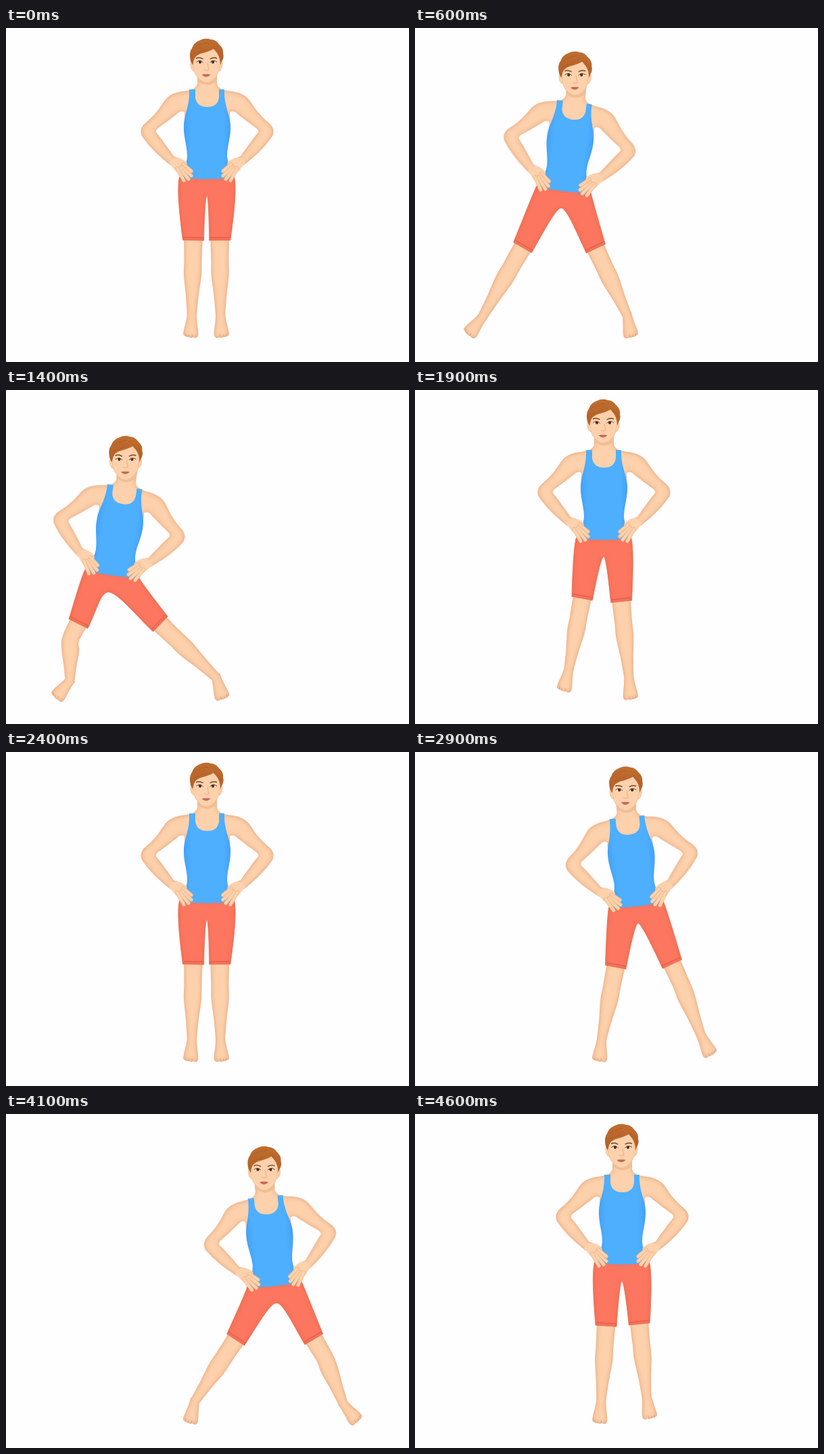
Animation of 596 by 495 pixels, one loop 4700 ms. Source, as an HTML page:

```html
<!DOCTYPE html>
<html lang="en">
<head>
<meta charset="utf-8">
<title>Side lunges</title>
<style>
  html, body { margin: 0; width: 100%; height: 100%; overflow: hidden; background: #fefdff; }
  svg { display: block; width: 596px; height: 495px; }
  .skin { fill: #fdd1ab; }
  .line { fill: none; stroke: #dfa67c; stroke-width: 1; stroke-linecap: round; }
  .finger { fill: none; stroke-linecap: round; }
  .soft { filter: url(#shade); }
</style>
</head>
<body>
<svg viewBox="0 0 596 495">
  <defs>
    <!-- darkens the inside of every edge -->
    <filter id="shade" x="-10%" y="-10%" width="120%" height="120%" color-interpolation-filters="sRGB">
      <feGaussianBlur in="SourceAlpha" stdDeviation="3.5" result="blur"/>
      <feComposite in="SourceAlpha" in2="blur" operator="out" result="rim"/>
      <feFlood flood-color="#b0552a" flood-opacity=".42"/>
      <feComposite in2="rim" operator="in" result="tint"/>
      <feMerge><feMergeNode in="SourceGraphic"/><feMergeNode in="tint"/></feMerge>
    </filter>
    <linearGradient id="blue">
      <stop offset="0" stop-color="#3f9bf2"/><stop offset=".2" stop-color="#4eafff"/>
      <stop offset=".8" stop-color="#4eafff"/><stop offset="1" stop-color="#3f9bf2"/>
    </linearGradient>
    <linearGradient id="hair" x2="0" y2="1">
      <stop offset="0" stop-color="#c06d2f"/><stop offset="1" stop-color="#b2602a"/>
    </linearGradient>

    <path id="arm" class="skin" d="M270 93C254 94 243 97 235 107C228 117 221 129 207 140Q196 149 201 160
      C212 177 230 193 243 203L256 207L259 194L248 190C241 180 232 167 223 156Q220 153 224 149
      C234 142 244 134 252 128Q259 121 264 125L274 105Z"/>
    <g id="hand">
      <path class="skin" d="M241 200Q246 191 254 192Q262 194 267 199L269 208L262 217Q255 217 250 211Z"/>
      <g class="finger" id="fingers"></g>
    </g>
    <g id="foot">
      <path class="skin" d="M-7 -30C-7 -17 -10 -9 -11 0Q-12 6 -8 6Q-6 8 -3 7Q0 9 3 7Q10 10 11 3
        C11 -5 7 -16 7 -30Z"/>
      <path class="line" d="M-7 3V6M-3 4V7M2 3V7" opacity=".8"/>
    </g>
  </defs>

  <g class="soft"><path id="shinL" class="skin"/><use id="footL" href="#foot"/></g>
  <g class="soft"><path id="shinR" class="skin"/><use id="footR" href="#foot"/></g>
  <path id="shorts" class="soft" fill="#fd765f" stroke="#fd765f" stroke-width=".8" stroke-linejoin="round"/>
  <path id="hems" fill="none" stroke="#dd5743" stroke-width="1"/>

  <g id="torso">
    <g class="soft">
      <use href="#arm"/><use href="#arm" transform="translate(595) scale(-1 1)"/>
      <path class="skin" d="M283 62L283 83Q281 91 267 93L254 103L264 125L264 150H331L331 125L341 103
        L328 93Q314 91 312 83L312 62Z"/>
    </g>
    <path fill="url(#blue)" d="M271 91L280 91L280 103Q282 117 298 117Q313 117 315 103L315 91L323 91
      C322 115 331 127 332 143C333 162 327 174 327 190C328 203 333 211 337 222Q297 226 258 222
      C262 211 267 203 268 190C268 174 262 162 263 143C264 127 272 115 271 91Z"/>
    <use href="#hand"/><use href="#hand" transform="translate(595) scale(-1 1)"/>
  </g>

  <g id="head">
    <path d="M283 71Q297 89 312 71L312 78Q298 91 283 78Z" fill="#f0be94"/>
    <g class="skin" stroke="#efbd94" stroke-width=".8">
      <path d="M278 50Q272 47 273 55Q274 64 279 64ZM315 50Q321 47 320 55Q319 64 314 64Z"/>
      <path d="M277 43C276 56 278 65 281 70Q289 81 296 81Q304 81 312 70C315 65 317 56 316 43
        Q312 26 296 25Q280 26 277 43Z"/>
    </g>
    <path fill="url(#hair)" d="M276 55L273 49Q270 36 275 30Q278 21 287 18Q295 14 303 17Q310 17 315 24
      Q322 30 321 38Q323 43 319 50L317 55Q317 44 312 37L307 31Q300 35 288 38Q280 41 278 47Z"/>
    <path d="M278 38Q288 36 296 31M278 30Q287 23 299 22M307 29Q315 33 318 42" fill="none"
      stroke="#a4551f" stroke-width=".9" opacity=".6"/>
    <path d="M281 45Q286 42.5 291.500 46M301.500 46Q307 42.5 312 45" fill="none" stroke="#7b4427" stroke-width="1.4"/>
    <path d="M282 51Q287 47 291 51.5Q287 53.5 282 51ZM302 51.5Q306 47 311 51Q306 53.5 302 51.5Z" fill="#fff4ec"/>
    <circle cx="287" cy="50.5" r="2.2" fill="#4d2d1f"/><circle cx="306" cy="50.5" r="2.2" fill="#4d2d1f"/>
    <path d="M281.500 50.5Q287 46 291.500 51.5M301.500 51.5Q306 46 312 50.5" fill="none" stroke="#5d3624"/>
    <path class="line" d="M298 52Q299 58 300 61M293 62Q296 64 300 62" opacity=".8"/>
    <path d="M290 69.500Q294 67.500 296 68.500Q299 67.500 302 69.500Q296 75.500 290 69.500Z" fill="#cf735f"/>
    <path d="M290 69.500Q296 71 302 69.500" fill="none" stroke="#aa5747" stroke-width=".8"/>
  </g>
</svg>
<script>
const LOOP = 4700, STEP = 100, CENTER = 297, WAIST = 221;
const $ = id => document.getElementById(id);

// time, body shift, waist y, lean, foot reach, foot lift, knee bend
const LUNGE = [
  [0, 0, 221, 0, 0, 0, 0],
  [150, 2, 221, .5, 4, -2, 0],
  [300, 12, 222, 3.5, 58, -9, 0],
  [400, 30, 226, 6, 116, -8, 3],
  [500, 52, 231, 6.5, 168, -6, 0],
  [600, 77, 239, 7, 190, -2, 0],
  [750, 112, 256, 7, 192, 0, 13],
  [927, 144, 272, 7, 192, 0, 32],
  [1200, 159, 280, 8, 194, 0, 33],
  [1400, 140, 272, 8.3, 195, 0, 16],
  [1600, 75, 240, 4, 190, -2, 2],
  [1700, 51, 228, 1.5, 140, -8, 0],
  [1800, 32, 221, 0, 87, -12, 0],
  [1900, 18, 219, 0, 52, -12, 0],
  [2000, 9, 220, 0, 28, -7, 0],
  [2150, 2, 221, 0, 6, -1, 0],
  [2300, 0, 221, 0, 0, 0, 0]
];
// The lunge to the right runs with slightly different timing.
const RIGHT_TIMING = [[2500, 0], [3100, 600], [3650, 1200], [4200, 1600], [4700, 2100]];

const segment = (rows, t) => {
  let i = 0;
  while (i < rows.length - 2 && t > rows[i + 1][0]) i++;
  return i;
};

function warp(t) {
  const i = segment(RIGHT_TIMING, t), [t0, u0] = RIGHT_TIMING[i], [t1, u1] = RIGHT_TIMING[i + 1];
  return u0 + (u1 - u0) * (t - t0) / (t1 - t0);
}

// Smooth cubic interpolation between the poses.
function sample(u) {
  u = Math.min(u, 2300);
  const i = segment(LUNGE, u), a = LUNGE[i], b = LUNGE[i + 1];
  const prev = LUNGE[i - 1] || a, next = LUNGE[i + 2] || b;
  const span = b[0] - a[0], k = (u - a[0]) / span, k2 = k * k, k3 = k2 * k;
  return a.slice(1).map((v, j) => {
    j++;
    const m0 = (b[j] - prev[j]) / (b[0] - prev[0]) * span;
    const m1 = (next[j] - v) / (next[0] - a[0]) * span;
    return (2 * k3 - 3 * k2 + 1) * v + (k3 - 2 * k2 + k) * m0 + (3 * k2 - 2 * k3) * b[j] + (k3 - k2) * m1;
  });
}

const rad = deg => deg * Math.PI / 180;
const mix = (p, q, k) => [p[0] + (q[0] - p[0]) * k, p[1] + (q[1] - p[1]) * k];
const along = (p, d, n) => [p[0] + d[0] * n, p[1] + d[1] * n];
const turn = ([x, y], deg) => {
  const c = Math.cos(rad(deg)), s = Math.sin(rad(deg));
  return [x * c - y * s, x * s + y * c];
};
const unit = (p, q) => {
  const x = q[0] - p[0], y = q[1] - p[1], n = Math.hypot(x, y);
  return [x / n, y / n];
};
const outward = (d, side) => [side * d[1], -side * d[0]];
const pt = p => p.map(n => n.toFixed(1)).join(" ");

function spline(points) {
  let d = "";
  for (let i = 0; i < points.length - 1; i++) {
    const p = points[i], q = points[i + 1], o = points[i - 1] || p, r = points[i + 2] || q;
    const c1 = [p[0] + (q[0] - o[0]) / 6, p[1] + (q[1] - o[1]) / 6];
    const c2 = [q[0] - (r[0] - p[0]) / 6, q[1] - (r[1] - p[1]) / 6];
    d += `C${pt(c1)} ${pt(c2)} ${pt(q)}`;
  }
  return d;
}

function poseLeg(side, place, pose) {
  const moving = side === pose.side;
  const reach = moving ? pose.reach : 0, bend = moving ? pose.bend : 0;
  const splay = moving ? Math.min(38, 3 + reach * .2) : 3 + pose.shift * .1;
  const toe = [296 + side * (22.5 + reach), 451 + (moving ? pose.lift : 0)];
  const angle = -side * splay;
  const ankle = along(toe, turn([0, -1], angle), 26);
  const hip = place([side * 18.5, 19]);
  const axis = unit(hip, ankle);
  const knee = along(mix(hip, ankle, .56 + bend * .0025), outward(axis, side), bend);
  const thigh = unit(hip, knee), shin = unit(knee, ankle);
  const hem = mix(hip, knee, .72);
  const nThigh = outward(thigh, side), nShin = outward(shin, side);
  const nKnee = mix(nThigh, nShin, .5);

  const edge = sign => [
    along(mix(hip, knee, .62), nThigh, sign * 14),
    along(knee, nKnee, sign * 13),
    along(mix(knee, ankle, .28), nShin, sign * 13),
    along(mix(knee, ankle, .64), nShin, sign * 9.5),
    along(ankle, nShin, sign * 7)
  ];
  const outer = edge(1), inner = edge(-1).reverse(), name = side < 0 ? "L" : "R";
  $("shin" + name).setAttribute("d", `M${pt(outer[0])}${spline(outer)}L${pt(inner[0])}${spline(inner)}Z`);
  $("foot" + name).setAttribute("transform",
    `translate(${pt(toe)}) rotate(${angle}) scale(${-side} 1)`);

  return {
    waist: place([side * 40.5, 0]),
    bulge: along(hip, nThigh, 27),
    outer: along(hem, nThigh, 15.5),
    inner: along(hem, nThigh, -15.5),
    rise: along(along(hem, nThigh, -15.5), thigh, -34),
    stitch: [15, -15].map(w => along(along(hem, thigh, -4), nThigh, w))
  };
}

function draw(time) {
  const t = Math.floor(time % LOOP / STEP) * STEP;
  const side = t < 2500 ? -1 : 1;
  const [shift, y, lean, reach, lift, bend] = sample(side < 0 ? t : warp(t));
  const pose = { side, shift, reach, lift, bend };
  const x = CENTER + side * shift, tilt = -side * lean;
  const place = p => along([x, y], turn(p, tilt), 1);

  const L = poseLeg(-1, place, pose), R = poseLeg(1, place, pose);
  const gap = 2 + shift * .08;
  const crotch = place([0, 28]), left = place([-gap, 28]), right = place([gap, 28]);
  $("shorts").setAttribute("d",
    `M${pt(L.waist)}Q${pt(L.bulge)} ${pt(L.outer)}L${pt(L.inner)}` +
    `C${pt(L.rise)} ${pt(left)} ${pt(crotch)}C${pt(right)} ${pt(R.rise)} ${pt(R.inner)}` +
    `L${pt(R.outer)}Q${pt(R.bulge)} ${pt(R.waist)}Z`);
  $("hems").setAttribute("d", [L, R].map(leg => "M" + leg.stitch.map(pt).join("L")).join(""));

  $("torso").setAttribute("transform",
    `translate(${x - CENTER} ${y - WAIST}) rotate(${tilt} ${CENTER} ${WAIST})`);
  const neck = place([0, -130]);
  $("head").setAttribute("transform", `translate(${neck[0] - CENTER + tilt * .2} ${neck[1] - 91})`);
}

// Each finger is a wide dark stroke with a lighter one on top.
$("fingers").innerHTML = ["M262 202L274 212", "M260 206L274 219", "M257 208L270 224", "M253 208L263 226"]
  .map(d => `<path d="${d}" stroke="#e6b086" stroke-width="5.6"/><path d="${d}" stroke="#fdd1ab" stroke-width="4.4"/>`)
  .join("");

const start = performance.now();
function tick() {
  draw(performance.now() - start);
  requestAnimationFrame(tick);
}
tick();
</script>
</body>
</html>
```
